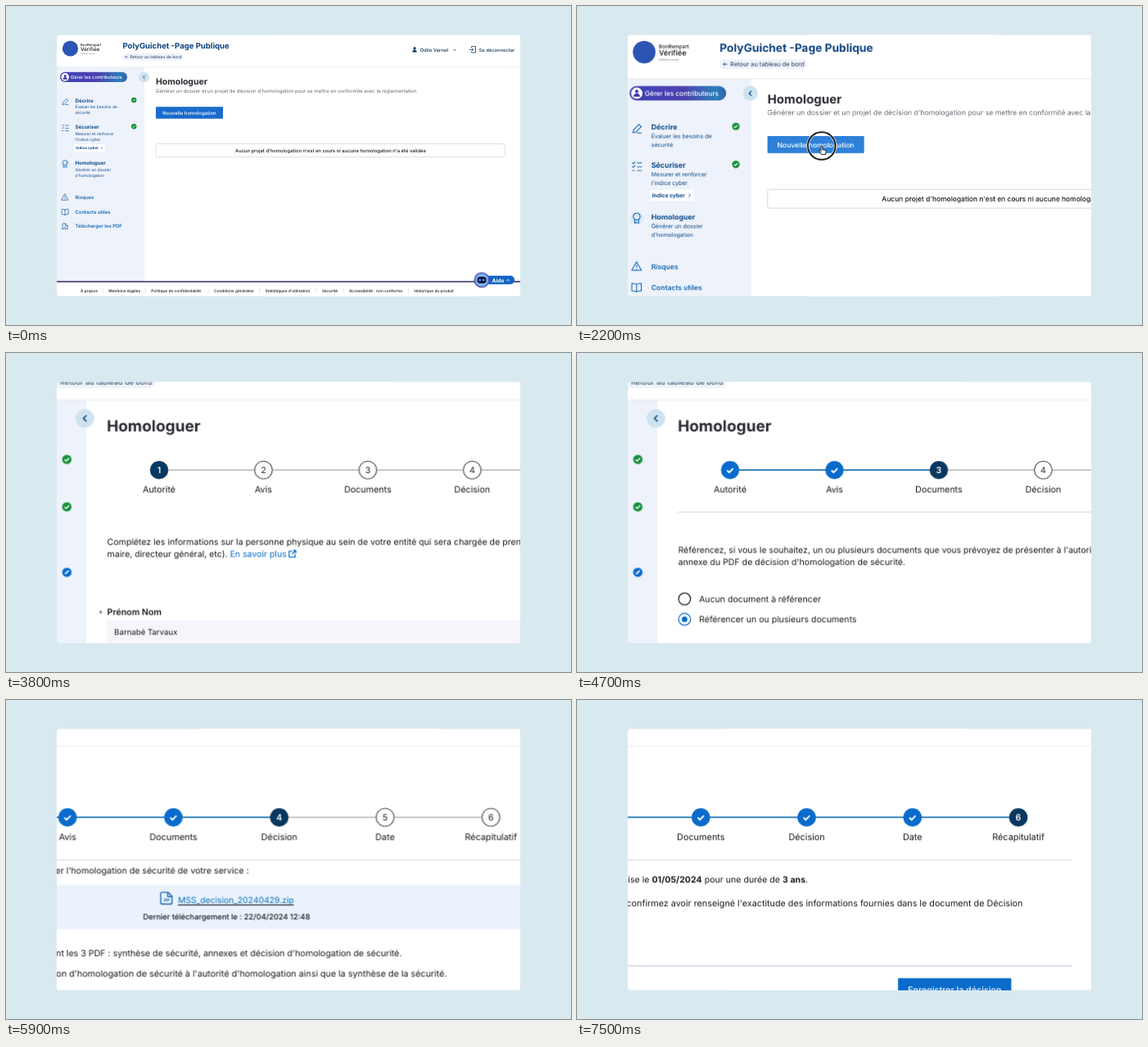
Recreate the animation shown at these times as an HTML page. Size 690 by 390 pixels, loop 8 s.

```html
<!DOCTYPE html>
<html lang="fr">
<head>
<meta charset="utf-8">
<title>Homologuer</title>
<style>
html, body { margin: 0; height: 100%; overflow: hidden; background: #d9e9f0; }
svg { display: block; width: 690px; height: 390px; }
text { font-family: Inter, "Open Sans", sans-serif; text-rendering: geometricPrecision; white-space: pre; }
.icon { fill: none; stroke: #1668b4; stroke-width: .75; stroke-linecap: round; stroke-linejoin: round; }
.cam { animation: cam 8s infinite cubic-bezier(.65, 0, .35, 1); }
.pointer { animation: pointer 8s infinite ease-in-out; }
.hover { animation: hover 8s infinite step-end; }

@keyframes cam {
  0%, 15.25% { transform: translate(0px, 0px) scale(1); }
  23.625%, 37.499% { transform: translate(-31px, -18.5px) scale(1.44); }
  37.5%, 38.75% { transform: translate(0px, 0px) scale(1); }
  47.5%, 69.999% { transform: translate(-209.7px, -78px) scale(1.818); }
  70%, 79.999% { transform: translate(-456.5px, -80.8px) scale(1.844); }
  80%, 100% { transform: translate(-509.7px, -80.8px) scale(1.844); }
}
@keyframes pointer {
  0%, 1.25% { transform: translate(360px, 60px); }
  11.25% { transform: translate(240px, 100px); }
  18.75% { transform: translate(233px, 118px); }
  24%, 37.499% { transform: translate(229px, 132px); }
  37.5%, 38.75% { transform: translate(337px, 219px); }
  47.5%, 100% { transform: translate(545px, 326px); }
}
@keyframes hover {
  0% { fill: #1b6bcb; }
  20% { fill: #2f80d9; }
}
</style>
</head>
<body>
<script>
const LOOP = 8000;
const INK = '#18181c', GREY = '#666773', NAVY = '#0d4d8c', BLUE = '#0a6bcc', DEEP = '#08375f';
let css = '', spans = 0;

// Text placed by the middle of its capitals
const T = (x, y, s, size = 5.8, fill = INK, weight = 400, anchor = 'start') =>
  `<text x="${x}" y="${(y + size * .36).toFixed(2)}" font-size="${size}" fill="${fill}" font-weight="${weight}" text-anchor="${anchor}">${s}</text>`;
const R = (x, y, w, h, fill, rx = 0, more = '') =>
  `<rect x="${x}" y="${y}" width="${w}" height="${h}" fill="${fill}" rx="${rx}" ${more}/>`;
const C = (x, y, r, fill, more = '') => `<circle cx="${x}" cy="${y}" r="${r}" fill="${fill}" ${more}/>`;
const P = (d, more = 'class="icon"') => `<path d="${d}" ${more}/>`;
const stroke = (color, w) => `fill="none" stroke="${color}" stroke-width="${w}"`;
const line = (x1, x2, y, color, w = .6) => P(`M${x1} ${y}H${x2}`, stroke(color, w));
const tick = (x, y, k = 1) => P(`M${x - 1.7 * k} ${y}l${1.2 * k} ${1.2 * k} ${2.2 * k} ${-2.3 * k}`, stroke('#fff', .85 * k));

// Shows its content from one time to another, in ms
function span(from, to, body) {
  const id = 'span' + spans++, pc = t => t / LOOP * 100 + '%';
  css += `@keyframes ${id}{0%{opacity:0}${pc(from)}{opacity:1}${pc(to)}{opacity:0}}\n`;
  return `<g style="animation:${id} 8s infinite step-end">${body}</g>`;
}

const badge = y => C(156.2, y, 3.2, '#18913a') + tick(156.2, y, .9);
const blueBadge = C(156.2, 192, 3.2, BLUE) + P('M155 193.2l2.4-2.4', stroke('#fff', 1));

const menuItem = (y, title, lines) => T(84.5, y, title, 6.2, NAVY, 700) +
  lines.map((s, i) => T(84.5, y + 7.8 + i * 7, s, 4.85, NAVY)).join('');

const menuIcons =
  P('M69 120.5l.6-2.6 4.4-4.6 2 2-4.5 4.5zM72.5 120.6h3.5') +
  P('M68.5 146l.8.8 1.4-1.6M72.5 146h3.8M68.5 149l.8.8 1.4-1.6M72.5 149.4h3.8M68.5 152.6h1.6M72.5 152.6h3.8') +
  C(72.2, 193, 5.6, '#dbe8f7') + C(72.2, 191.6, 2.9, 'none', 'class="icon"') + P('M70.5 194.2v3.2l1.7-1 1.7 1v-3.2') +
  P('M72 230l4.1 7.2h-8.2zM72 232.8v1.8M72 236v.1') +
  P('M72 249.2c-1.2-.9-2.5-.9-4-.9v6.4c1.5 0 2.8 0 4 .9 1.2-.9 2.5-.9 4-.9v-6.4c-1.5 0-2.8 0-4 .9zv6.4') +
  P('M69 272.5v-6.5h3.6l2.6 2.5v4h-6.2zM72.5 266v2.7h2.7M71 270.6h2');

const shell = title =>
  C(78.5, 52, 9.6, '#2b54b4') +
  T(91, 47.2, 'BonRempart', 4.3, INK, 500) + T(91, 52.8, 'Vérifiée', 6.3, INK, 500) + T(91, 58.2, 'Initiative Locale', 2.3, GREY) +
  T(142.5, 48.2, title, 9.55, '#0f4380', 700) +
  R(142.5, 58, 74, 8.4, '#eef2f9', 4) + P('M149 62.2h-3.4m1.3-1.3l-1.3 1.3 1.3 1.3', stroke(NAVY, .6)) +
  T(151.5, 62.2, 'Retour au tableau de bord', 5.1, '#3d5674', 500) +
  C(499, 51.7, 1.6, DEEP) + P('M496.3 56.5c0-4 5.4-4 5.4 0z', `fill="${DEEP}"`) +
  T(505.5, 53.5, 'Odile Varnet', 5.9, DEEP, 500) + P('M546.5 53l1.5 1.5 1.5-1.5', stroke(DEEP, .8)) +
  P('M568.5 51v-1.5h5v7.5h-5v-1.5M565.5 53.3h5.3m-1.7-1.7l1.7 1.7-1.7 1.7', stroke(DEEP, .8)) +
  T(577.5, 53.5, 'Se déconnecter', 5.8, DEEP, 500) +
  R(66, 80.8, 82, 12.2, 'url(#pill)', 6.1) + C(72.2, 86.9, 4.8, '#fff') +
  C(72.2, 85.4, 1.5, '#4138a5') + P('M69.4 89.8c0-3.7 5.6-3.7 5.6 0z', 'fill="#4138a5"') +
  T(79, 86.9, 'Gérer les contributeurs', 5.7, '#fff', 500) +
  C(168.5, 87, 6.3, '#cfe3ee') + P('M169.5 84.9l-2 2.1 2 2.1', stroke(NAVY, .9)) +
  menuItem(115.6, 'Décrire', ['Évaluer les besoins de', 'sécurité']) +
  menuItem(148, 'Sécuriser', ['Mesurer et renforcer', "l'indice cyber"]) +
  R(83.5, 169, 37, 9.2, '#fff', 1) + T(85.3, 173.6, 'Indice cyber', 4.6, NAVY, 700) +
  P('M116.3 172.2l1.4 1.4-1.4 1.4', stroke(NAVY, .6)) +
  menuItem(192, 'Homologuer', ['Générer un dossier', "d'homologation"]) +
  [['Risques', 234], ['Contacts utiles', 251.9], ['Télécharger les PDF', 269.3]].map(([s, y]) => T(84.5, y, s, 5.95, '#1668b4', 600)).join('') +
  menuIcons + badge(115) + badge(147.3);

const help = x => `<g transform="translate(${x} 335)">` +
  R(0, -5.2, 40, 10.4, '#1266c4', 5) + C(0, 0, 9.6, '#5a55bd') + C(0, 0, 8, '#79b4e8') +
  R(-5.5, -4, 11, 8, '#151a4e', 3.6) + C(-2.2, 0, 1.1, '#7fe0ff') + C(2.2, 0, 1.1, '#7fe0ff') +
  T(12.5, .3, 'Aide', 6.6, '#fff', 700) + P('M30 1.3l2-2 2 2', stroke('#fff', .9)) + '</g>';

const links = [[91, 'À propos'], [125.3, 'Mentions légales'], [177.3, 'Politique de confidentialité'], [254, 'Conditions générales'],
  [316.5, "Statistiques d'utilisation"], [386, 'Sécurité'], [419, 'Accessibilité : non conforme'], [498.5, 'Historique du produit']];
const footer = R(62, 337, 566, 18, '#fff') + line(62, 628, 337, '#332a5e', 1.4) +
  links.map(([x, s], i) => T(x, 348, s, 4.8, INK, 500) + (i ? P(`M${x - 7} 344.5v7`, stroke('#ccc', .5)) : '')).join('');

const home =
  T(183, 103.4, "Générer un dossier et un projet de décision d'homologation pour se mettre en conformité avec la réglementation", 6, GREY) +
  R(183, 123.3, 82, 14.5, '#1b6bcb', .8, 'class="hover"') + T(224, 130.7, 'Nouvelle homologation', 5.95, '#fff', 500, 'middle') +
  R(183, 168.5, 426.5, 16, '#fff', 2.5, 'stroke="#d3d3da" stroke-width=".7"') +
  T(396.5, 176.7, "Aucun projet d'homologation n'est en cours ni aucune homologation n'a été validée", 5.85, INK, 500, 'middle');

const stepX = i => 218.2 + 70.1 * i;
function stepper(now) {
  const y = 121.6;
  let s = '';
  for (let i = 0; i < 5; i++) s += line(stepX(i), stepX(i + 1), y, i < now ? '#1a74b4' : '#a6a6ac', i < now ? 1 : .7);
  ['Autorité', 'Avis', 'Documents', 'Décision', 'Date', 'Récapitulatif'].forEach((name, i) => {
    const x = stepX(i);
    s += i < now ? C(x, y, 6.1, BLUE) + tick(x, y + .2, 1.2)
      : i === now ? C(x, y, 6.1, DEEP) + T(x, y, i + 1, 5.8, '#fff', 600, 'middle')
      : C(x, y, 5.9, '#fff', 'stroke="#55555d" stroke-width=".6"') + T(x, y, i + 1, 5.8, '#44444c', 500, 'middle');
    s += T(x, 134.7, name, 5.9, INK, 400, 'middle');
  });
  return s + (now ? line(183, 604, 149.9, '#dcdce4') : '');
}

const fieldBox = y => R(183, y, 421, 16.5, '#f5f5fb') + line(183, 604, y + 16.5, '#e2e2ec', .5);
const field = (y, label) => T(177.5, y + 1, '*', 5.8, GREY) + T(183.3, y, label, 5.85, INK, 600) + fieldBox(y + 5.5);
const button = (x, y, w, h, s) => R(x, y, w, h, BLUE, .6) + T(x + w / 2, y + h / 2, s, 5.85, '#fff', 500, 'middle');
const radio = (y, s, on) => C(187.6, y, 4, '#fff', `stroke="${on ? BLUE : INK}" stroke-width=".7"`) +
  (on ? C(187.6, y, 1.9, BLUE) : '') + T(197.3, y, s);
const endText = (x, y, s, size = 5.75) => T(x, y, s, size, INK, 400, 'end');

const authority =
  T(183.3, 170, "Complétez les informations sur la personne physique au sein de votre entité qui sera chargée de prendre la décision d'homologation de sécurité (ex:") +
  T(183.3, 178.2, `maire, directeur général, etc). <tspan fill="${BLUE}">En savoir plus</tspan>`) +
  P('M307.5 176.2h-2v4h4v-2M308 175.7h2v2M310 175.7l-2.5 2.5', stroke(BLUE, .7)) +
  T(604, 203.2, '* champ obligatoire', 5.9, INK, 400, 'end') +
  field(217, 'Prénom Nom') + field(260.5, 'Fonction') +
  line(183, 604, 312.5, '#c8c8d0') + button(527, 321, 36.5, 14.5, 'Suivant');
const answers = T(188, 230.7, 'Barnabé Tarvaux', 5.3) + T(188, 274, 'Directeur Général des Services', 5.35);

const opinion =
  T(183.3, 175.2, "Consignez, si vous le souhaitez, un ou plusieurs avis rendus sur la sécurité de votre service à l'attention de l'autorité", 5.74) +
  T(183.3, 183.2, "d'homologation de sécurité.") +
  radio(208.3, 'Aucun avis à renseigner', true) + radio(222, 'Renseigner un ou plusieurs avis');

const papers =
  T(183.3, 175.2, "Référencez, si vous le souhaitez, un ou plusieurs documents que vous prévoyez de présenter à l'autorité d'homologation en", 5.74) +
  T(183.3, 183.2, "annexe du PDF de décision d'homologation de sécurité.") +
  radio(208.3, 'Aucun document à référencer') + radio(222, 'Référencer un ou plusieurs documents', true);

const decision =
  endText(408.4, 157.1, "Téléchargez les documents pour finaliser l'homologation de sécurité de votre service :") +
  R(183, 166.3, 421, 29.6, '#eaf2fd') +
  P('M350 178.5v-6.2q0-1 1-1h3.8l2.7 2.6v4.2q0 1-1 1h-5.5q-1 0-1-1M354.6 171.5v2.6h2.7') + T(353.9, 176.3, 'ZIP', 2.6, BLUE, 700, 'middle') +
  `<g text-decoration="underline">${T(361.4, 176.4, 'MSS_decision_20240429.zip', 5.6, '#0b72b5')}</g>` +
  T(393.6, 187.3, 'Dernier téléchargement le : 22/04/2024 12:48', 5.05, INK, 500, 'middle') +
  endText(509.7, 211.8, "Ce dossier est un fichier ZIP comprenant les 3 PDF : synthèse de sécurité, annexes et décision d'homologation de sécurité.") +
  endText(539.5, 225.4, "Transmettez la décision d'homologation de sécurité à l'autorité d'homologation ainsi que la synthèse de la sécurité.", 5.83);

const date =
  endText(520, 162.7, "Renseignez la date de signature ainsi que la durée de validité de la décision d'homologation de sécurité.") +
  fieldBox(173) + line(183, 604, 220, '#c9c9e4');

const bold = s => `<tspan font-weight="700">${s}</tspan>`;
const recap =
  endText(429.4, 162.7, `La décision d'homologation sera prise le ${bold('01/05/2024')} pour une durée de ${bold('3 ans')}.`) +
  endText(571.6, 178.5, "En enregistrant, vous confirmez avoir renseigné l'exactitude des informations fournies dans le document de Décision", 5.85) +
  line(183, 604, 220, '#c9c9e4') + button(489, 228.2, 75, 15.2, 'Enregistrer la décision');

const arrow = P('M0 0v5.6l1.4-1.2.9 2 .9-.4-.9-2 1.8-.1z', 'fill="#111" stroke="#fff" stroke-width=".4"');
const hand = P('M-.6.5c0-1 1.4-1 1.4 0v2.3l2.2.5q.9.3.7 1.4l-.5 2.2h-3.2l-2-2.6c-.4-.7.5-1.3 1-.7l.4.5z', 'fill="#fff" stroke="#111" stroke-width=".55"');
const ring = C(229, 131.6, 11.7, 'none', 'stroke="#fff" stroke-opacity=".75" stroke-width="2.6"') +
  C(229, 131.6, 11.7, 'none', 'stroke="#111" stroke-width="1.3"');

const steps = [[2500, 3900, authority], [3900, 4700, opinion], [4700, 5600, papers],
  [5600, 6400, decision], [6400, 7400, date], [7400, LOOP, recap]];

const stage =
  R(62, 35.5, 566, 319, '#fff') + R(62, 74.5, 107.2, 281, '#eef2fa') + line(62, 628, 74.5, '#e9ebf0') +
  T(183, 92.1, 'Homologuer', 10.45, '#2a2a32', 700) +
  span(0, 2500, home) +
  steps.map(([from, to, body], i) => span(from, to, stepper(i) + body)).join('') +
  span(3000, 3900, answers) +
  span(0, 3000, footer + shell('PolyGuichet -Page Publique') + help(581)) +
  span(2500, 3000, blueBadge) +
  span(3000, LOOP, `<g transform="matrix(.986 0 0 .986 2.2 1.1)">${shell('PolyGuichet - Page Publique')}${blueBadge}</g>${help(575)}`) +
  span(2200, 2500, ring) +
  `<g class="pointer">${span(200, 1900, arrow)}${span(1900, 3000, hand)}${span(3000, 3900, arrow)}</g>`;

document.body.innerHTML = `<svg viewBox="0 0 690 390">
  <defs>
    <clipPath id="frame"><rect x="62" y="35.5" width="566" height="319" rx="3.5"/></clipPath>
    <linearGradient id="pill"><stop stop-color="#3f45b4"/><stop offset=".55" stop-color="#4d40b0"/><stop offset=".9" stop-color="#2a7fb8"/><stop offset="1" stop-color="#3560b0"/></linearGradient>
  </defs>
  <g clip-path="url(#frame)">${R(62, 35.5, 566, 319, '#fff')}<g class="cam">${stage}</g></g>
</svg>`;
const sheet = document.createElement('style');
sheet.textContent = css;
document.head.append(sheet);
</script>
</body>
</html>
```
